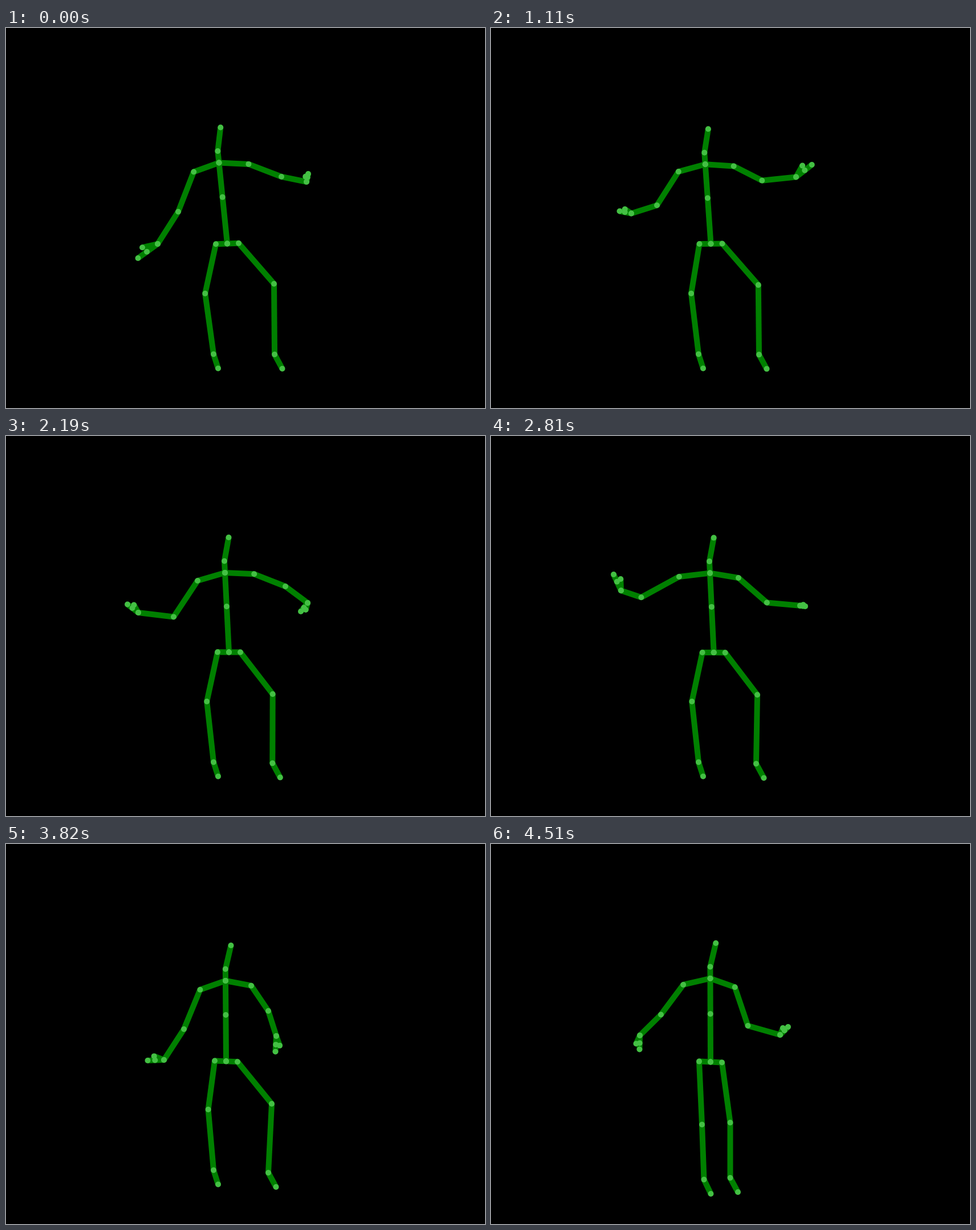
An HTML page with a canvas for the animation above (4590 ms loop, 840 by 667 pixels).

```html
<!DOCTYPE html>
<html lang="en">
<head>
<meta charset="utf-8">
<title>Dancing skeleton</title>
<style>
  html, body { margin: 0; height: 100%; overflow: hidden; background: #000; }
  canvas { display: block; }
</style>
</head>
<body>
<canvas id="stage" width="840" height="667"></canvas>
<script>
const ctx = document.getElementById('stage').getContext('2d');
const LOOP = 4590;

// Key poses; each arm is elbow, wrist and fingertip. The other joints follow by rule.
const poses = [
  { step: 0, hip: 388, chest: [373.5, 236.5],
    left: [[302, 322.5], [266, 379], [231.5, 404]], right: [[483, 261], [527, 270], [530, 256]] },
  { step: 9, hip: 389, chest: [369.5, 242],
    left: [[311, 334.5], [279, 391], [247, 412]], right: [[478.5, 228.5], [535, 209], [560, 194.5]] },
  { step: 21, hip: 382, chest: [382, 236.5],
    left: [[276, 288], [223, 260], [214, 231]], right: [[467, 307], [525, 314], [555.5, 285.5]] },
  { step: 29, hip: 391, chest: [384, 240],
    left: [[294, 317.5], [232, 310], [213, 295.5]], right: [[490, 264], [529, 293], [517, 308]] },
  { step: 43, hip: 390.5, chest: [384, 241],
    left: [[258.5, 261], [255, 246], [246, 209]], right: [[465, 311], [521, 301], [543.5, 293]] },
  { step: 50, hip: 386, chest: [385, 240],
    left: [[312, 325], [277, 379], [248.5, 380]], right: [[460, 293], [474, 337], [472.5, 364.5]] },
  { step: 59, hip: 385, chest: [384.5, 236],
    left: [[298, 299.5], [261, 336], [260.5, 360.5]], right: [[450.5, 319], [507, 335], [521, 321]] }
];

const mix = (a, b, u) => Array.isArray(a) ? a.map((v, i) => mix(v, b[i], u)) : a + (b - a) * u;
const smooth = u => u * u * (3 - 2 * u);
const clamp = u => Math.max(0, Math.min(1, u));
const add = ([x, y], dx, dy) => [x + dx, y + dy];

function stepAt(t) {
  return Math.floor(0.1 + (t < 648 ? t / 72.2 : 9 + (t - 650) / 77.2));
}

// side is -1 for the left arm and 1 for the right; swing pushes the arm outward
function armChains(chest, points, side, swing) {
  const [elbow, wrist, tip] = points.map(([x, y], i) => [x + side * swing * (i ? 1 : 0.5), y]);
  const shoulder = add(chest, side * 30 + 0.2 * (elbow[0] - chest[0]),
    0.22 * (elbow[1] - chest[1]) - 3);
  const hand = mix(wrist, tip, 0.55);
  const angle = Math.atan2(tip[1] - wrist[1], tip[0] - wrist[0]) - side * 0.4;
  const reach = 0.65 * Math.hypot(tip[0] - wrist[0], tip[1] - wrist[1]);
  const thumb = add(wrist, reach * Math.cos(angle), reach * Math.sin(angle));
  return [[chest, shoulder, elbow, wrist, hand, tip], [wrist, thumb]];
}

// The wide stance drifts slowly, then the feet come together
function legChains(base, hipL, hipR, lean, step) {
  const drift = step / 50;
  const shift = drift * drift;
  const together = smooth(clamp((step - 50) / 7));
  const [kneeL, ankleL, kneeR, ankleR] = mix(
    [[355 + 0.4 * lean, 466], [364, 572.5], [470 - 4 * drift, 449 + 7 * drift],
      [471 - 11 * shift, 573 + 4 * shift]],
    [[370, 492.5], [373.5, 589], [419.5, 489], [419.5, 586]], together);
  return [
    [base, hipL, kneeL, ankleL, add(ankleL, 8 + 4 * together, 25)],
    [base, hipR, kneeR, ankleR, add(ankleR, 13.5, 25)]
  ];
}

function skeleton(step) {
  const next = Math.max(1, poses.findIndex(p => p.step >= step));
  const from = poses[next - 1];
  const to = poses[next];
  const u = clamp((step - from.step) / (to.step - from.step));
  const blend = part => mix(from[part], to[part], smooth(u));
  const swing = 7 * (next - 1) * Math.sin(Math.PI * u * u);

  const chest = blend('chest');
  const base = [blend('hip'), 378.5 + 4 * (step / 59) ** 2];
  const lean = chest[0] - base[0];
  const tilt = 0.12 * (lean + 8);
  const neck = add(chest, 0.15 * lean, -20.5);
  const head = add(neck, 10 + 0.35 * lean, -41.5);
  const spine = mix(chest, base, 0.425);

  return [
    [head, neck, chest, spine, base],
    ...legChains(base, add(base, -20, -tilt), add(base, 20, tilt), lean, step),
    ...armChains(chest, blend('left'), -1, swing),
    ...armChains(chest, blend('right'), 1, swing)
  ];
}

function drawBone(a, b) {
  ctx.beginPath();
  ctx.moveTo(...a);
  ctx.lineTo(...b);
  ctx.stroke();
}

function drawJoint(joint) {
  ctx.beginPath();
  ctx.arc(...joint, 5, 0, 2 * Math.PI);
  ctx.fill();
}

function draw(step) {
  const chains = skeleton(step);
  ctx.clearRect(0, 0, 840, 667);
  ctx.strokeStyle = '#008000';
  ctx.fillStyle = '#44c044';
  ctx.lineWidth = 10;
  for (const chain of chains) {
    chain.slice(1).forEach((joint, i) => drawBone(chain[i], joint));
  }
  chains.flat().forEach(drawJoint);
}

function tick() {
  draw(stepAt(performance.now() % LOOP));
  requestAnimationFrame(tick);
}
tick();
</script>
</body>
</html>
```
